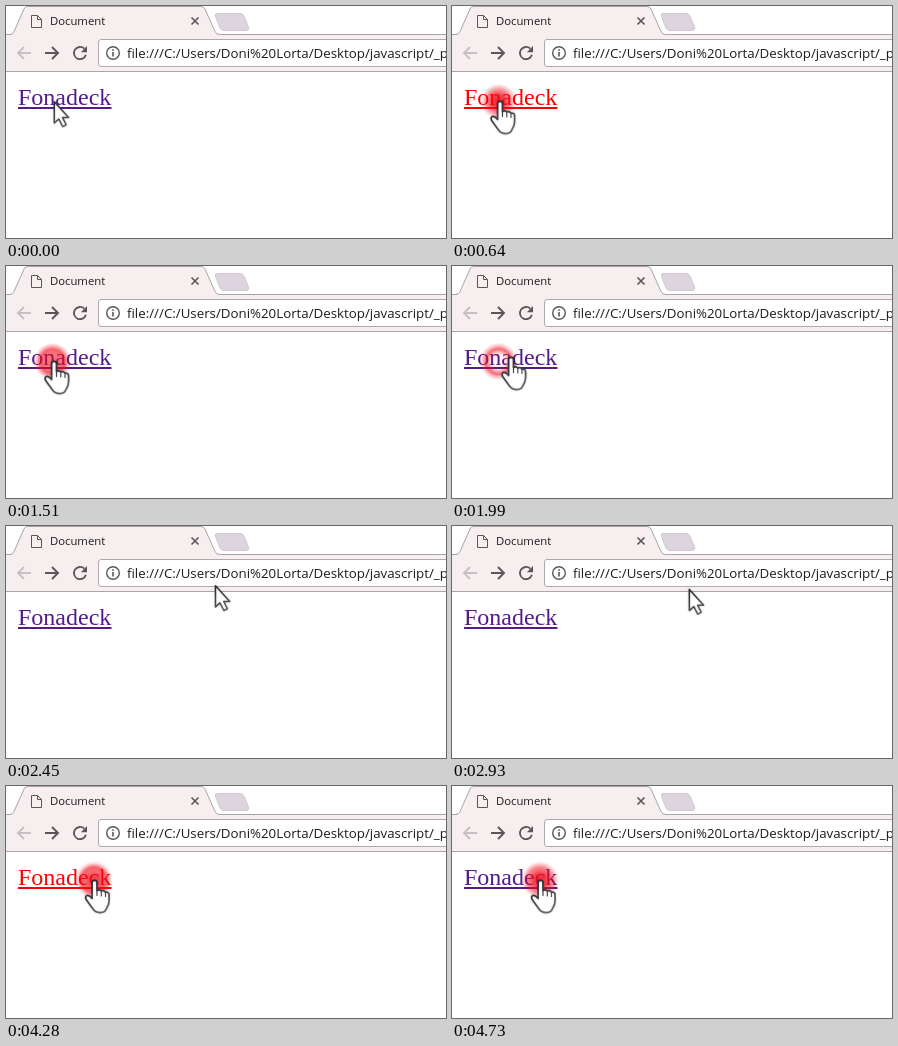
An HTML page with a canvas for the animation above (4.76 s loop, 440 by 232 pixels).

```html
<!DOCTYPE html>
<html lang="en">
<head>
<meta charset="utf-8">
<title>Document</title>
<style>
html, body { margin: 0; width: 100%; height: 100%; overflow: hidden; background: #fff; }
canvas { display: block; width: 440px; height: 232px; }
</style>
</head>
<body>
<canvas id="stage" width="440" height="232"></canvas>
<script>
const ctx = document.getElementById('stage').getContext('2d');
const LOOP = 4760, START = 460, STEP = 30;
const FADE = 450, GROW = 100;

// Pointer tip: time, x, y
const route = [
  [0, 48, 95], [1780, 48, 95], [1990, 59, 91], [2080, 66, 88],
  [2260, 210, 58], [2420, 210, 58], [2570, 193, 77], [2770, 241, 28],
  [2930, 237, 63], [3150, 259, 23], [3470, 130, 74], [3530, 122, 80],
  [3760, 88.5, 94], [LOOP, 88.5, 94]
];

// Mouse presses: down, up, x, y
const clicks = [
  [520, 680, 46.5, 95.5], [1000, 1110, 46.5, 95.5],
  [1310, 1430, 46.5, 95.5], [1620, 1765, 46.5, 95.5],
  [3870, 4010, 88, 94], [4180, 4330, 88, 94], [4560, 4705, 88, 94]
];

// Glow opacity from centre to rim, held and released
const rings = [0, 0.38, 0.66, 0.84, 1];
const held = [1, 0.84, 0.5, 0.22, 0];
const released = [0.04, 0.14, 1, 0.36, 0];

const clamp = v => Math.max(0, Math.min(1, v));

function slope(i, axis) {
  if (i === 0 || i === route.length - 1) return 0;
  const rate = (a, b) => (b[axis] - a[axis]) / (b[0] - a[0]);
  const l = rate(route[i - 1], route[i]), r = rate(route[i], route[i + 1]);
  return l * r <= 0 ? 0 : 2 * l * r / (l + r);
}

// Monotone cubic along the route
function along(t, axis) {
  let i = 0;
  while (i < route.length - 2 && t >= route[i + 1][0]) i++;
  const a = route[i], b = route[i + 1], d = b[0] - a[0];
  const u = (t - a[0]) / d, v = 1 - u;
  return a[axis] * v * v * (1 + 2 * u) + b[axis] * u * u * (3 - 2 * u)
    + d * u * v * (v * slope(i, axis) - u * slope(i + 1, axis));
}

function shape(d, fill, stroke, width = 1) {
  const p = new Path2D(d);
  if (fill) { ctx.fillStyle = fill; ctx.fill(p); }
  if (stroke) { ctx.strokeStyle = stroke; ctx.lineWidth = width; ctx.stroke(p); }
}

function label(text, x, y, font, color) {
  ctx.font = font;
  ctx.fillStyle = color;
  ctx.fillText(text, x, y);
}

function circle(x, y, r) {
  ctx.beginPath();
  ctx.arc(x, y, r, 0, 7);
}

function drawBrowser() {
  const pale = '#f7eeef', line = '#aaa4a6', ink = '#5a5557', dark = '#1c1c1c';
  ctx.fillStyle = '#fff';
  ctx.fillRect(0, 0, 440, 232);
  ctx.fillStyle = pale;
  ctx.fillRect(0, 28, 440, 38);
  shape('M0 28.5H440M0 65.5H440', null, line);
  const tab = 'Q7 28 8 25.5L18 3Q19 .5 21.5 .5H195Q198 .5 199 3L208.8 25Q210 28.5 213.5 28.5';
  shape('M4 29' + tab + 'V29Z', pale);
  shape('M0 28.5H4' + tab, null, line);
  shape('M211 7.5H234Q237 7.5 238 10L242.5 21Q243.5 24.5 240 24.5H218Q215 24.5 214 22L209.5 10.5Q208.5 7.5 211 7.5Z',
    '#ddd4dd', '#d0c8d0');

  shape('M25.5 9.5H31.5L35.5 13.5V21.5H25.5ZM31.5 9.5V13.5H35.5', null, ink);
  label('Document', 44, 19, '11.3px "Open Sans", sans-serif', dark);
  shape('M185.5 11.5L192.5 18.5M192.5 11.5L185.5 18.5', null, ink, 1.6);

  shape('M25 47H12.5M18 41L12 47L18 53', null, '#c7c0c2', 1.9);
  shape('M39 47H51.5M46 41L52 47L46 53', null, ink, 1.9);
  shape('M78.3 42.7A6.1 6.1 0 1 0 79.9 48.8', null, ink, 1.8);
  shape('M81 40V46.2H74.9Z', ink);

  shape('M445 33.5H95Q92.5 33.5 92.5 36V58Q92.5 60.5 95 60.5H445Z', '#fff', '#b0a9ab');
  circle(107, 47, 6.3);
  ctx.strokeStyle = ctx.fillStyle = ink;
  ctx.lineWidth = 1.4;
  ctx.stroke();
  ctx.fillRect(106.2, 43.3, 1.6, 1.6);
  ctx.fillRect(106.2, 46, 1.6, 4.5);
  label('file:///C:/Users/Doni%20Lorta/Desktop/javascript/_p', 121, 52,
    '13.3px "Open Sans", sans-serif', dark);
}

function drawLink(pressed) {
  label('Fonadeck', 12, 99, '24px "Liberation Serif", serif', pressed ? '#f00' : '#551a8b');
  ctx.fillRect(12, 101, 93.5, 2);
}

function glow(x, y, r, alpha, open) {
  const g = ctx.createRadialGradient(x, y, 0, x, y, r);
  rings.forEach((at, i) => {
    const a = alpha * (held[i] + (released[i] - held[i]) * open);
    g.addColorStop(at, `rgba(242,10,24,${a})`);
  });
  ctx.fillStyle = g;
  circle(x, y, r);
  ctx.fill();
}

function drawClick(t, [down, up, x, y]) {
  if (t < down || t > up + FADE) return;
  if (t < up) {
    const k = clamp((t - down) / GROW);
    glow(x, y, 4 + 14 * k, 0.9 * k, 0);
  } else {
    const u = (t - up) / FADE;
    glow(x, y, 18 + 2 * u, Math.min(0.9, 1.2 * (1 - u)), clamp(u * 3 - 0.2));
  }
}

function drawPointer(x, y, hand) {
  ctx.save();
  ctx.translate(x, y);
  ctx.lineJoin = ctx.lineCap = 'round';
  ctx.shadowColor = 'rgba(0,0,0,.2)';
  ctx.shadowBlur = 2;
  const edge = ctx.createLinearGradient(0, 4, 14, 26);
  edge.addColorStop(0, '#2f2e37');
  edge.addColorStop(1, '#66656b');
  if (hand) {
    shape('M-2.4 18.5V2.5Q-2.4 .3 0 .3Q2.5 .3 2.5 2.5V10.5Q4.6 8.8 6.8 11Q9.2 9.8 11 12.2'
      + 'Q14.6 11.8 14.6 15V20.5Q14.6 25 12 28.5Q10.5 32.6 6 32.6Q1 32.6-1.5 29'
      + 'L-8 20Q-10 16.7-7.6 15.5Q-5.2 15-2.4 18.5Z', '#fff', edge, 1.7);
    ctx.shadowColor = 'transparent';
    shape('M2.5 10.5V15.5M6.8 11V16M11 12.2V16.5', null, edge, 1.2);
  } else {
    shape('M.3 .8V22L4.8 18L8.7 25.6L12.2 23.8L8.6 16.6H14.6Z', '#fff', edge, 1.5);
  }
  ctx.restore();
}

function draw(now) {
  let t = now % LOOP;
  t = t < START ? 0 : START + Math.floor((t - START) / STEP) * STEP;
  const x = along(t, 1), y = along(t, 2);
  const hand = t >= START && x < 106 && y > 78 && y < 104;
  drawBrowser();
  drawLink(clicks.some(([down, up]) => t >= down && t < up));
  clicks.forEach(c => drawClick(t, c));
  drawPointer(x, y, hand);
}

const begin = performance.now();
function tick() {
  draw(performance.now() - begin);
  requestAnimationFrame(tick);
}
tick();
</script>
</body>
</html>
```
